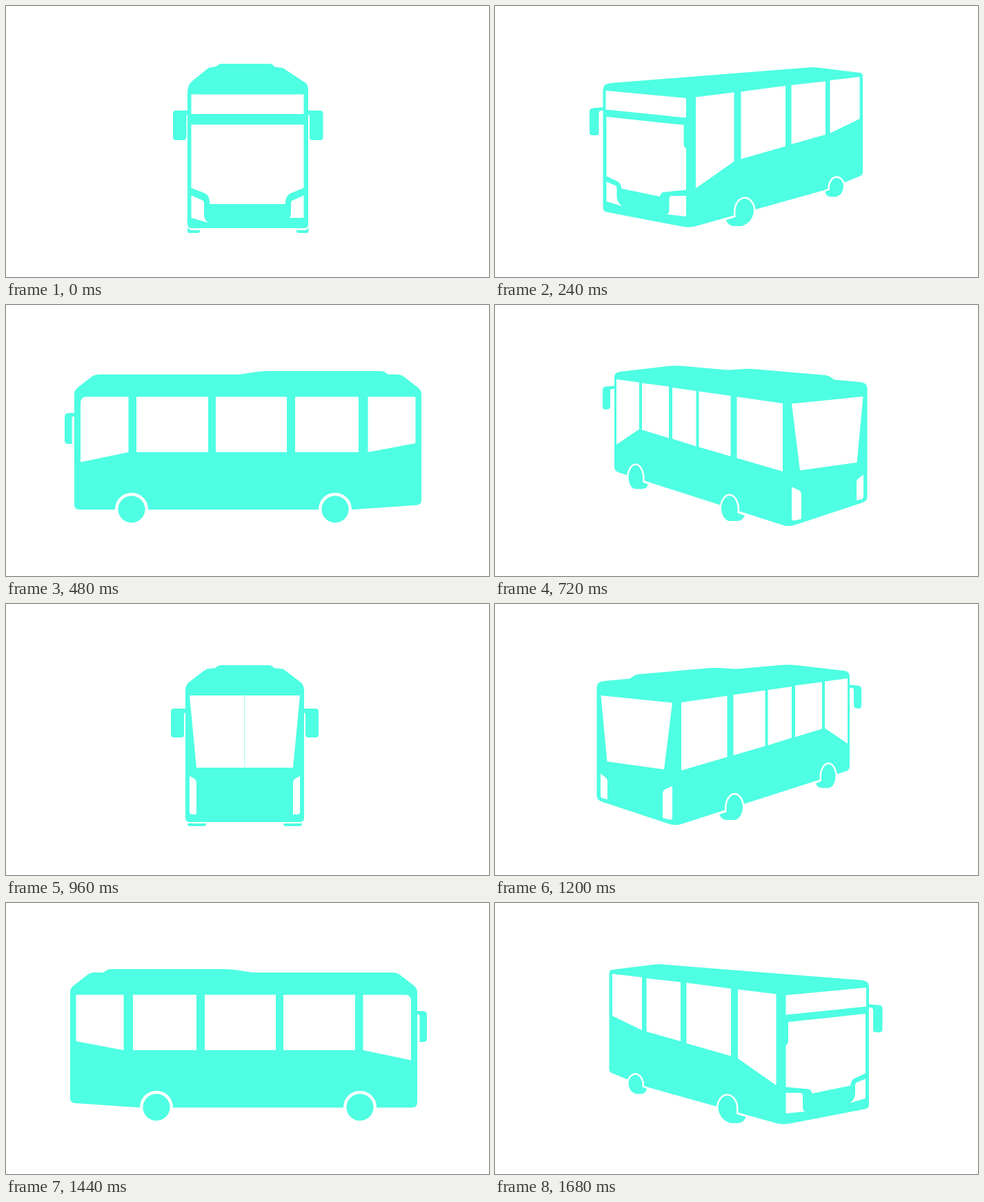
Recreate the animation shown at these times as an HTML page. Size 700 by 394 pixels, loop 1.92 s.

```html
<!DOCTYPE html>
<html lang="en">
<head>
<meta charset="utf-8">
<title>Turning bus</title>
<style>
  html, body { margin: 0; width: 100%; height: 100%; overflow: hidden; background: #fff; }
  svg { display: block; width: 100%; height: 100%; }
  .paint { fill: #4effe3; }
  .glass { fill: #fff; }
  .tire { fill: #4effe3; stroke: #fff; stroke-width: 5; paint-order: stroke; }
</style>
</head>
<body>
<svg id="stage" viewBox="0 0 700 394"></svg>
<script>
const STEP = 240;
const stage = document.getElementById("stage");

const shape = (kind, d) => `<path class="${kind}" d="${d}"/>`;
const paint = d => shape("paint", d);
const glass = d => shape("glass", d);
const tire = d => shape("tire", d);
const flip = (sum, art) => `<g transform="matrix(-1 0 0 1 ${sum} 0)">${art}</g>`;
const pane = (l, r) => `M${l} 133.5H${r}V214H${l}Z`;
const wheel = x =>
  `<circle class="glass" cx="${x}" cy="297" r="24"/><circle class="paint" cx="${x}" cy="297" r="19.6"/>`;

const front =
  paint("M263 127Q263 114 270 109L291 92Q294 89 299 89L305 88Q307 84 314 84H382Q387 84 389 88.5L401 90L433 111Q438 114 438 122V317Q438 323 432 323H270Q263 323 263 317Z") +
  glass("M268.5 128.5H431.5V157H268.5Z") +
  glass("M268.5 172.5H431.5V264.5L411 273Q405 277 404.5 288H295.5Q295 276 289 272.5L268.5 264.5Z") +
  glass("M268.5 275.5L285 282.5Q287 283.5 287 287V303Q287 311 293 315L268.5 308Z") +
  glass("M431.5 275.5L414.5 283Q413 284 413 287V301Q413 305 411 308H431.5Z") +
  paint("M264 152H246Q242 152 242 156V191Q242 195 246 195H257Q261.5 195 261.5 190V160Q261.5 158 264 158Z") +
  paint("M437 152H455Q459.5 152 459.5 156V191Q459.5 195 455.5 195H444Q440 195 440 191V160Q440 158 437 158Z") +
  paint("M263 322Q265 326 271 326H281Q281 330 278 330H266Q263 330 263 328Z") +
  paint("M438.5 322Q437 326 431 326H420.5Q421.5 330 424.5 330H435Q438.5 330 438.5 327Z");

const side =
  paint("M99 130Q99 124 104 120L124 104.5Q128 101 135 101H338L361 97.5Q370 96 380 96H541Q548 96 551 99L554 101H567Q573 101 577 104.5L597 120Q602 124 602 130V284Q602 290 595 291L500 297.5H107Q99 297.5 99 290Z") +
  glass("M108 228.5V143Q108 133.5 116 133.5H177.5V214Z") +
  glass(pane(189, 293) + pane(304, 407) + pane(419, 511)) +
  glass("M524.5 133.5H593.5V201L524.5 214Z") +
  paint("M100 157H91Q85 157 85 163V197Q85 202 90 202H95.5V164Q95.5 162 98 162H100Z") +
  wheel(182) + wheel(477);

const rearTurn =
  paint("M173 105Q173 98 181 97L250 89Q262 87.5 275 89L338 94.5L362 93Q370 92.5 380 93.5L478 102Q485 103 488 106L491 108.5L529 112Q539.5 113 539.5 121V279Q539.5 285 532 287.5L434 320Q426 322.5 417 320L178 243Q173 241 173 235Z") +
  glass("M176 108L209 112.5V180.5L176 203Z") +
  glass("M213 113.5L252 118.5V193.5L213 181.5Z") +
  glass("M257 120L291.5 125V205.5L257 194.5Z") +
  glass("M295.5 125.5L341.5 132V220L295.5 206.5Z") +
  glass("M350.5 133.5L417 143V242L350.5 222.5Z") +
  glass("M430 143.5L533.5 133L524.5 229L442 240.5Z") +
  glass("M430 264.5L440 269Q444 271 444 276V311L434 313.5Q430 314 430 309Z") +
  glass("M534 246.5V278Q534 281 531 282.5L524 284V258Q524 254 527 252Z") +
  paint("M174 117.5L161 118.5Q156 119 156 124V148Q156 152 160 152L164 151.5Q167 151 167 147V125Q167 122 170 122H174Z") +
  tire("M193.5 248A10.5 19 0 0 1 214 248V257.5L222 261Q220 267 213 267.5H203Q193.5 265 193.5 248Z") +
  tire("M328 294A12 21 0 0 1 351.5 294V302.5L362 306Q359 313 352 314H338Q328 309 328 294Z");

const frontTurn =
  paint("M165.5 103Q165.5 97.5 170 97L230 89.5Q238 88.5 246 89.5L530 112Q542 113 542 121V293Q542 298 537 299.5L428 320.5Q418 322.5 409 320.5L215 266L170 247.5Q165.5 246 165.5 241Z") +
  glass("M170 103L213 108V185L170 164Z") +
  glass("M219.5 109.5L269 115V201L219.5 187Z") +
  glass("M277.5 116L342 124.5V222.5L277.5 204Z") +
  glass("M352 125.5L407.5 132.5V265L352 226Z") +
  glass("M421.5 134L538 123V150.5L421.5 162.5Z") +
  glass("M425 173L537 161V247.5L521 255Q516 258 515 265.5L459.5 277Q458 271 454 270.5L421.5 267.5V207Q425 205 425 200Z") +
  glass("M421.5 276H443Q446 277 446 281V297Q446 302 450 303L421.5 306Z") +
  glass("M537 255.5L524 261Q522 262 522 266V276Q522 286 514 291L537 284Z") +
  paint("M541 147L557 148.5Q561.5 149 561.5 153V184Q561.5 188 557 188H552Q548 188 548 184V156Q548 152 544 152H541Z") +
  tire("M193.5 260A10.5 16 0 0 1 213.5 262V267.5L220 270Q219 277 212 277.5H206Q193.5 276 193.5 260Z") +
  tire("M323.5 295A13.5 19.5 0 0 1 350 297V307L363.5 311Q361 319 353 320H341Q323.5 314 323.5 295Z");

// One half of the rear, mirrored about x = 346
const rearHalf =
  paint("M347 89H312Q306 89 304 93L295 94Q290 94 287 97L266 113Q260 117 260 126V311Q260 317 267 317H347Z") +
  glass("M266 133H346.5V238H276Z") +
  glass("M266 250L273 254Q276 256 276 260V306H270Q266 306 266 302Z") +
  paint("M261 152H244Q239 152 239 156V190Q239 194 243 194H254Q258 194 258 190V160Q258 158 261 158Z") +
  paint("M263 319H290V320Q290 323 286 323H267Q263 323 263 320Z");
const rear = rearHalf + flip(692, rearHalf);

const poses = [
  front, flip(698.5, frontTurn), side, rearTurn,
  rear, flip(687, rearTurn), flip(695, side), frontTurn
];

stage.innerHTML = poses.map(art => `<g display="none">${art}</g>`).join("");
const groups = [...stage.children];
let shown = -1;

function draw(time) {
  const index = Math.floor(time / STEP) % poses.length;
  if (index === shown) return;
  groups.forEach((g, i) => g.setAttribute("display", i === index ? "inline" : "none"));
  shown = index;
}

function tick() {
  draw(performance.now() - start);
  requestAnimationFrame(tick);
}

const start = performance.now();
tick();
</script>
</body>
</html>
```
